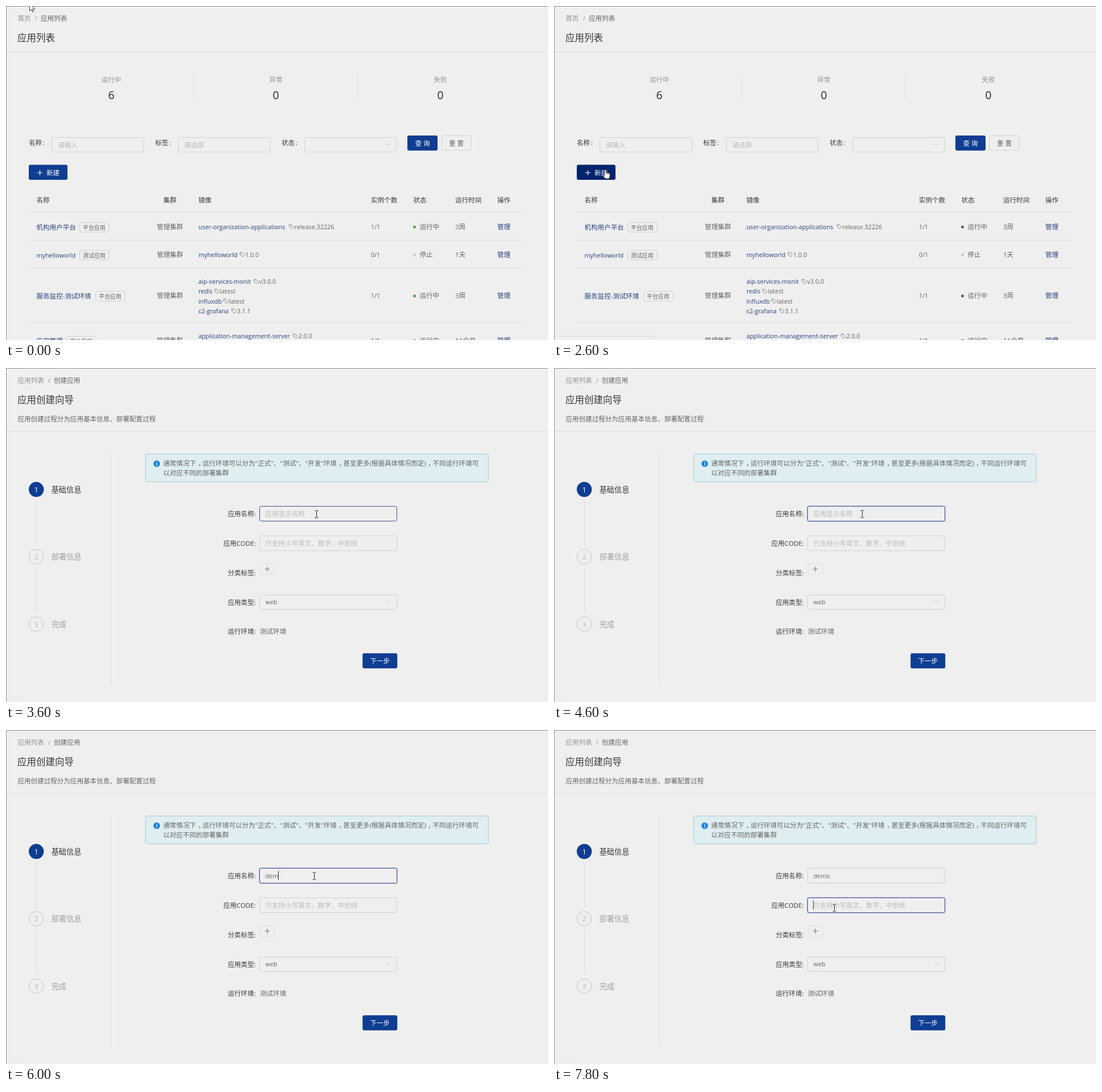
An HTML page that plays this animation: 952 by 588 pixels, repeating every 8 s.

```html
<!DOCTYPE html>
<html lang="zh-CN">
<head>
<meta charset="utf-8">
<style>
  html, body { margin: 0; width: 100%; height: 100%; overflow: hidden; background: #efefef; }
  svg { display: block; width: 100%; height: 100%; }
  text { font-family: "Open Sans", "Noto Sans CJK SC", "Noto Sans CJK", sans-serif; white-space: pre; }
</style>
</head>
<body>
<svg id="stage" viewBox="0 0 952 588" fill="none"></svg>
<script>
const LOOP = 8000, STEP = 200;
const BLUE = '#0f3d91', LINK = '#28427c', DARK = '#383838', MID = '#646464', GRAY = '#929292',
      HINT = '#b9b9b9', EDGE = '#d0d0d0', RULE = '#dcdcdc';

// Text is placed by its vertical centre; plain Latin runs slightly smaller than Chinese.
function text(x, cy, str, fill = MID, { size = 11.55, weight = 400, anchor = 'start', id = '' } = {}) {
  const px = /^[\x00-\x7f]*$/.test(str) ? size * 0.935 : size;
  // Full-width commas sit in the middle of their cell.
  const content = str.replace(/，(.)/g, '<tspan dx="3.5">，</tspan><tspan dx="-3.5">$1</tspan>');
  return `<text id="${id}" x="${x}" y="${cy + size * 0.36}" fill="${fill}" font-size="${px}"
    font-weight="${weight}" text-anchor="${anchor}">${content}</text>`;
}
const centred = (x, cy, str, fill, opts) => text(x, cy, str, fill, { anchor: 'middle', ...opts });
const line = (x1, y1, x2, y2, stroke = RULE) => `<path d="M${x1} ${y1}L${x2} ${y2}" stroke="${stroke}"/>`;
const box = (x, y, w, h, attrs = `stroke="${EDGE}"`) =>
  `<rect x="${x}" y="${y}" width="${w}" height="${h}" rx="3" ${attrs}/>`;
const circle = (x, y, r, attrs) => `<circle cx="${x}" cy="${y}" r="${r}" ${attrs}/>`;
const plus = (x, y, stroke) =>
  `<path d="M${x - 4.5} ${y}h9M${x} ${y - 4.5}v9" stroke="${stroke}" stroke-width="1.1"/>`;
const chevron = (x, y) => `<path d="M${x - 3.5} ${y - 2}l3.5 4l3.5 -4" stroke="#c4c4c4"/>`;
const button = (x, y, w, h, id = '') => box(x, y, w, h, `id="${id}" fill="${BLUE}"`);

function header(crumbs, title, slashX) {
  return text(20.5, 21.5, crumbs[0], GRAY) + text(slashX, 21.5, '/', GRAY) +
    text(slashX + 10, 21.5, crumbs[1], MID) + text(20, 56, title, DARK, { size: 16.5 });
}

function tableRow({ y, nameY = y + 1, name, tag, tagX, images, imageY = y, count, state, age }) {
  const versionIcon = (x, cy) =>
    `<path d="M${x} ${cy - 3.5}h3.6l4.2 4.2l-3.3 3.3l-4.5 -4.2z" stroke="#777" stroke-width=".9"/>` +
    circle(x + 2, cy - 1.6, 0.5, 'fill="#777"');
  return text(53.5, nameY, name, LINK) +
    box(tagX + .5, nameY - 8.5, 51.5, 17) + text(tagX + 6, nameY + .5, tag, MID, { size: 9.9 }) +
    centred(288, y, '管理集群', MID) +
    images.map(([image, version, x], i) => {
      const cy = imageY + i * 17.3;
      return text(338, cy, image, LINK) + versionIcon(x, cy) + text(x + 9, cy, version);
    }).join('') +
    text(641, y, count) +
    circle(717.5, y + .5, 2.5, state === '停止' ? 'fill="#cacaca"' : 'class="dot"') +
    text(726.5, y, state) + text(789, y, age) + text(863, y, '管理', LINK, { weight: 500 });
}

function listPage() {
  const stats = [['运行中', 6, 185], ['异常', 0, 474], ['失败', 0, 763]];
  const filters = [['名称', '请输入', 40], ['标签', '请选择', 262], ['状态', '', 484]];
  const heads = [['名称', 53.5], ['集群', 276.5], ['镜像', 338], ['实例个数', 641], ['状态', 715.5],
    ['运行时间', 789], ['操作', 863]];
  const rows = [
    { y: 388.5, name: '机构用户平台', tag: '平台应用', tagX: 129, count: '1/1', state: '运行中', age: '3周',
      images: [['user-organization-applications', 'release.32226', 497.5]] },
    { y: 437.5, name: 'myhelloworld', tag: '测试应用', tagX: 129, count: '0/1', state: '停止', age: '1天',
      images: [['myhelloworld', '1.0.0', 411]] },
    { y: 510, name: '服务监控-测试环境', tag: '平台应用', tagX: 157, count: '1/1', state: '运行中', age: '3周',
      imageY: 485, images: [['aip-services-monit', 'v3.0.0', 435.5], ['redis', 'latest', 366.5],
        ['influxdb', 'latest', 382.5], ['c2-grafana', '3.1.1', 396.5]] },
    { y: 588.5, nameY: 590, name: '应用管理', tag: '平台应用', tagX: 106, count: '1/1', state: '运行中',
      age: '11个月', imageY: 581, images: [['application-management-server', '2.0.0', 504.5]] }
  ];
  return header(['首页', '应用列表'], '应用列表', 51) + line(1, 81.5, 952, 81.5, '#d6d6d6') +
    stats.map(([label, n, x]) => centred(x, 130, label, GRAY) +
      centred(x, 156.5, String(n), '#262626', { size: 20.5 })).join('') +
    line(329.5, 120, 329.5, 166) + line(617.5, 120, 617.5, 166) +
    filters.map(([label, hint, x]) => text(x, 241, label, DARK) + text(x + 25, 241, ':', DARK) +
      box(x + 40.5, 231.5, 161.5, 25.5) + text(x + 51, 244.5, hint, HINT)).join('') +
    chevron(671, 244) +
    button(705, 228, 53, 26.5) + centred(731.5, 241.5, '查 询', '#fff', { weight: 500 }) +
    box(765.5, 228.5, 51.5, 25.5) + centred(791, 241.5, '重 置', MID) +
    button(40, 279.5, 68, 26.5, 'create') + plus(59.5, 293.5, '#fff') +
    text(71, 293.5, '新建', '#fff', { weight: 500 }) +
    heads.map(([label, x]) => text(x, 341.5, label, DARK, { weight: 500 })).join('') +
    [362.5, 412.5, 461.5, 557.5].map(y => line(40, y, 908, y)).join('') +
    rows.map(tableRow).join('');
}

function formPage() {
  const steps = ['基础信息', '部署信息', '完成'];
  const labels = ['应用名称:', '应用CODE:', '分类标签:', '应用类型:', '运行环境:'];
  const field = (id, y, hint) =>
    box(444.8, y - .7, 242.4, 27.4, `id="${id}Glow" stroke="#b4bddb" stroke-width="1.6" opacity="0"`) +
    box(445.5, y, 241, 26, `id="${id}Box" fill="#efefef"`) +
    text(455.5, y + 13.5, hint, HINT, { id: id + 'Hint' });
  return header(['应用列表', '创建应用'], '应用创建向导', 74) +
    text(20.5, 90, '应用创建过程分为应用基本信息、部署配置过程') +
    line(1, 111.5, 952, 111.5) + line(184.5, 151, 184.5, 556) +
    steps.map((label, i) => {
      const y = 213.8 + i * 118.5, active = i === 0;
      return circle(53.2, y, active ? 13.2 : 12.7, active ? `fill="${BLUE}"` : 'stroke="#c4c4c4"') +
        centred(53.2, y, String(i + 1), active ? '#fff' : HINT, { size: 13.2 }) +
        text(79.7, y, label, active ? DARK : '#a0a0a0', { size: 13.2, weight: active ? 500 : 400 });
    }).join('') +
    line(53.5, 233, 53.5, 313) + line(53.5, 351, 53.5, 432) +
    box(245.2, 151.3, 602, 49, 'fill="#dfeef0" stroke="#a2cbd0"') +
    circle(264.7, 168.5, 5.8, 'fill="#1d83e8"') +
    '<path d="M264.7 165v1.4M264.7 167.3v4.4" stroke="#fff" stroke-width="1.2"/>' +
    text(276, 168, '通常情况下，运行环境可以分为"正式"、"测试"、"开发"环境，甚至更多(根据具体情况而定)，不同运行环境可') +
    text(276, 185, '以对应不同的部署集群') +
    labels.map((label, i) => text(438.8, 257 + i * 51.8, label, DARK, { anchor: 'end' })).join('') +
    field('name', 243.5, '应用显示名称') + text(455.5, 257, '', MID, { id: 'typed' }) +
    field('code', 295.5, '只支持小写英文、数字、中划线') +
    box(446.5, 344.5, 25, 18.5, `stroke="${EDGE}" stroke-dasharray="2 1.5"`) + plus(459, 354, '#777') +
    box(445.5, 399.5, 241, 25.5) + text(455.5, 412, 'web') + chevron(672, 412) +
    text(446, 464, '测试环境') +
    button(626.3, 502.2, 61, 26.5) + centred(656.8, 515.5, '下一步', '#fff', { weight: 500 }) +
    '<path id="caret" stroke="#333"/>';
}

const pointers = {
  arrow: '<path d="M.5 .5v13.2l3 -2.8l2 4.7l2 -.8l-2 -4.6h4.1z" fill="#fff" stroke="#222" stroke-width=".9"/>',
  hand: `<path d="M-1.3 8.5V1.2Q0 -.7 1.3 1.2V5.2Q2.8 4.2 3.8 5.8Q5.2 4.9 6.1 6.4Q7.6 5.8 8.2 7.4V11.5L6.8 16H-.2
    L-4.2 10.5Q-4 8.4 -2.6 9.2L-1.3 10.5z" fill="#fff" stroke="#222" stroke-width=".9"/>
    <path d="M1.3 5.2v3.3M3.8 5.8v2.8M6.1 6.4v2.4" stroke="#444" stroke-width=".7"/>`,
  beam: '<path d="M-3 -6.2h2.2l.8 .7l.8 -.7h2.2M0 -5.5v11M-3 6.2h2.2l.8 -.7l.8 .7h2.2" stroke="#222"/>'
};

const stage = document.getElementById('stage');
stage.innerHTML = `<rect width="952" height="588" fill="#efefef"/>
  <g id="list">${listPage()}</g><g id="form">${formPage()}</g>
  <rect id="statusBar" x="-2" y="581.5" width="179" height="12" rx="2" fill="#f0f0f0" stroke="#d8d8d8"/>
  <path id="residue" d="M14 577.5h4M22 577.5h5" stroke="#e3e3e3"/>
  <path d="M0 .5H952M.5 0V588" stroke="#8e8e96"/>` +
  Object.entries(pointers).map(([name, art]) => `<g id="${name}">${art}</g>`).join('');

const $ = id => document.getElementById(id);
const show = (id, on) => $(id).setAttribute('visibility', on ? 'visible' : 'hidden');
const set = (id, name, value) => $(id).setAttribute(name, value);
const at = (track, t) => track.filter(key => key[0] <= t).pop();

const pointerTrack = [
  [0, 41, -5, 'arrow'], [200, 190, 110, 'arrow'], [400, 278, 184, 'arrow'], [1600, 277, 188, 'arrow'],
  [1800, 255, 204, 'arrow'], [2000, 195, 240, 'arrow'], [2200, 120, 280, 'arrow'], [2400, 90, 288, 'hand'],
  [2800, 90, 288, 'arrow'], [3200, 245, 280, 'arrow'], [3400, 520, 259, 'beam'], [3600, 545.5, 257.5, 'beam'],
  [3800, 541.5, 257, 'beam'], [7000, 532, 279, 'beam'], [7200, 505, 330, 'arrow'], [7400, 492.5, 313, 'beam']
];
const typingTrack = [[0, ''], [5800, 'd'], [6000, 'dem'], [6200, 'demo']];
const caretTrack = [[0, false], [4200, true], [4600, false], [5200, true], [5600, false], [5800, true],
  [6800, false], [7600, true]];
// Field highlight: border tint, then glow strength
const nameTrack = [[0, EDGE, 0], [3400, '#3f4e84', 0], [4000, '#44548f', .5], [4200, '#4a5a96', 1],
  [7600, '#9da4bd', .3], [7800, EDGE, 0]];
const codeTrack = [[0, EDGE, 0], [7400, '#3f4e84', 0], [7600, '#44548f', .5], [7800, '#4a5a96', 1]];
const createTrack = [[0, BLUE], [2400, '#082f80'], [2600, '#00236c']];

function render(now) {
  const t = Math.floor((now % LOOP) / STEP) * STEP;
  const onForm = t >= 2800;
  $('list').style.display = onForm ? 'none' : '';
  $('form').style.display = onForm ? '' : 'none';
  show('statusBar', t >= 2600 && t < 3200);
  show('residue', t >= 3200);
  set('create', 'fill', at(createTrack, t)[1]);
  for (const dot of document.querySelectorAll('.dot')) dot.setAttribute('fill', t >= 2400 ? '#526b48' : '#4bab45');

  for (const [id, track] of [['name', nameTrack], ['code', codeTrack]]) {
    const [, stroke, glow] = at(track, t);
    set(id + 'Box', 'stroke', stroke);
    set(id + 'Glow', 'opacity', glow);
  }
  const typed = at(typingTrack, t)[1];
  $('typed').textContent = typed;
  $('nameHint').style.display = typed ? 'none' : '';
  const inCode = t >= 7600;
  const caretX = 455.5 + (inCode || !typed ? 0 : Math.round($('typed').getComputedTextLength()));
  set('caret', 'd', `M${caretX} ${inCode ? 300 : 248}v16`);
  $('caret').style.display = at(caretTrack, t)[1] ? '' : 'none';

  const [, x, y, shape] = at(pointerTrack, t);
  for (const name in pointers) show(name, name === shape);
  set(shape, 'transform', `translate(${x} ${y})`);
}

const start = performance.now();
function tick() {
  render(performance.now() - start);
  requestAnimationFrame(tick);
}
tick();
</script>
</body>
</html>
```
